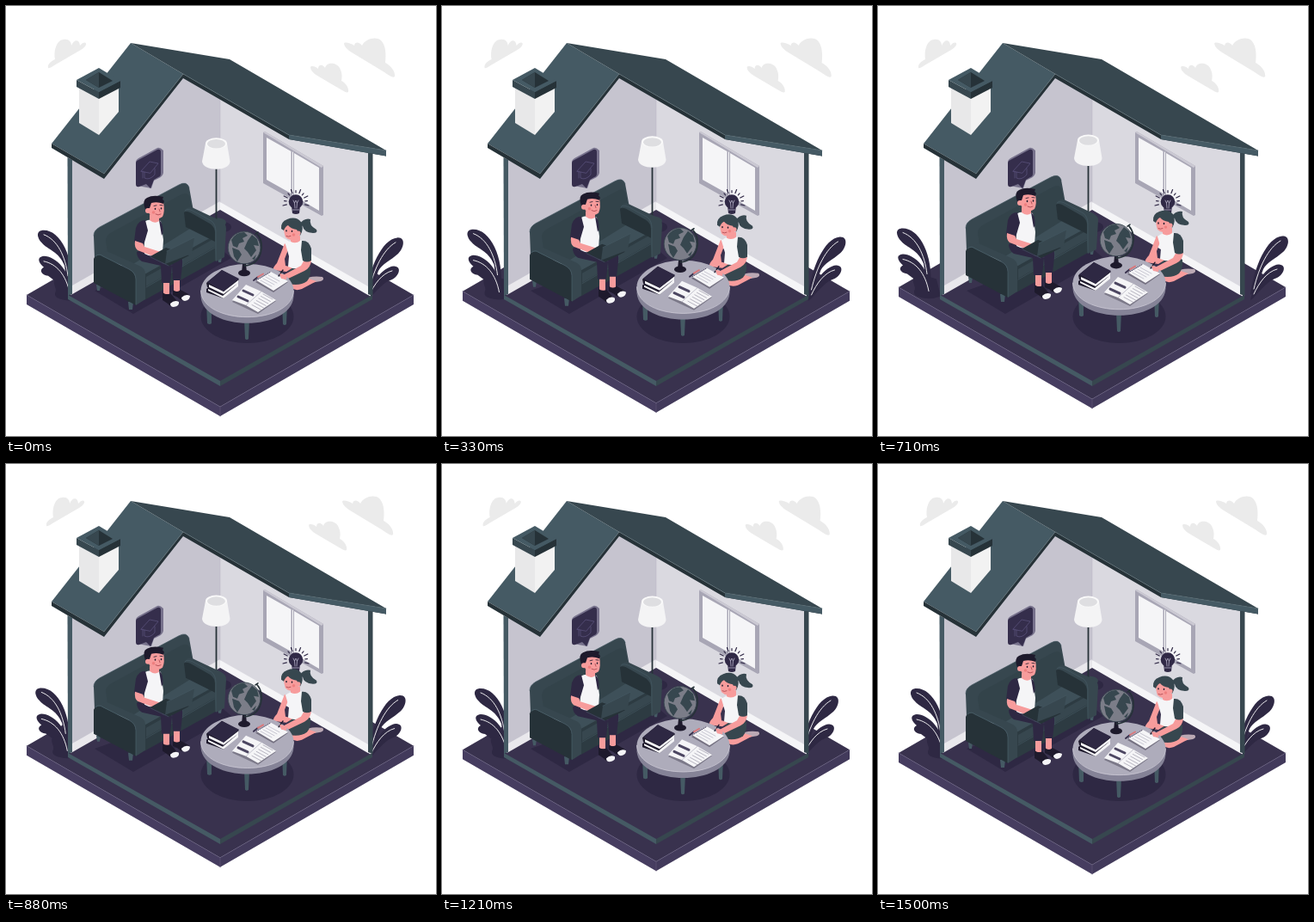
Recreate the animation shown at these times as an HTML page. Size 500x500 px, loop 1540 ms.

```html
<!DOCTYPE html>
<html lang="en">
<head>
<meta charset="utf-8">
<title>Studying at home</title>
<style>
html,body{margin:0;width:100%;height:100%;overflow:hidden;background:#fff}
svg{display:block;width:100vw;height:100vh}
.t{fill:#455a64}.m{fill:#37474f}.d{fill:#263238}
.n{fill:#39324e}.k{fill:#2e2843}.h{fill:#1e1a2c}
.w{fill:#f5f5f7}.s{fill:#f79c9c}.s2{fill:#bba9b4}
.l{fill:none;stroke-linecap:round;stroke-linejoin:round}
</style>
</head>
<body>
<svg viewBox="0 0 500 500">
<g id="clouds" fill="#ebebeb">
  <path d="M49 72C48 67 53 64 57 62C55 50 60 39 67 39C73 38 76 42 76 46C79 39 85 38 86 46C90 41 94 42 93 45Q92 48 87 51L56 69Q50 73 49 72Z"/>
  <path d="M393 44C393 41 400 43 405 46C406 41 411 42 414 46C418 38 430 35 436 40C442 46 442 57 441 66C447 69 453 76 452 82C450 84 446 81 440 77L402 54Q394 49 393 44Z"/>
  <path d="M354 71C355 69 360 70 363 73C363 67 369 68 371 72C373 64 385 66 388 72C391 78 391 82 390 87C396 90 399 96 398 100C396 102 388 96 384 94L362 81Q354 76 354 71Z"/>
</g>

<g id="plate">
  <path class="n" d="M24 336L249 206L474 336L249 466Z"/>
  <path fill="#463d60" d="M24 336L249 466V477L24 347Z"/>
  <path fill="#423a5b" d="M474 336L249 466V477L474 347Z"/>
  <path class="l" stroke="#625a7b" stroke-width=".6" d="M24 336L249 466L474 336M249 466V477"/>
</g>

<g id="plantL">
  <g class="k">
    <path d="M77 332C81 292 64 261 45 261C35 261 37 270 43 276C50 284 62 285 69 302L72 326Z"/>
    <path d="M78 340C78 308 58 291 45 291C36 292 39 299 45 304C39 307 42 313 50 314L58 320L72 338Z"/>
    <path d="M58 334C61 329 56 326 57 320Q66 313 84 320L89 340Q76 345 64 341Q57 339 58 334Z"/>
  </g>
  <path class="l" stroke="#fff" stroke-width=".9" d="M45 266C61 272 70 291 73 314M45 297C60 300 71 313 75 334"/>
</g>
<g id="plantR">
  <g class="k">
    <path d="M417 338C421 306 436 271 454 269.500C465 269 461 283 455 288C446 296 436 300 432 308L424 330Z"/>
    <path d="M417 344C421 325 437 303 450 302.500C460 303 456 314 448 318C438 321 431 330 420 342Z"/>
  </g>
  <path class="l" stroke="#fff" stroke-width=".9" d="M452 275C438 283 427 305 421 331M448 308C436 311 427 324 421 337"/>
</g>

<g>
  <path fill="#c6c4cf" d="M75 178L114 197L206 80L249 104V238L75 337Z"/>
  <path fill="#dad9e0" d="M249 104L329 152L424 168V338L249 238Z"/>
  <path fill="#e9e8ec" d="M77 325L249 227V239L77 337Z"/>
  <path class="w" d="M249 228L421 326V338L249 239Z"/>
  <path class="n" d="M72 338L249 237L426 339L249 438Z"/>
  <path class="l" stroke="#b9b7c4" stroke-width=".5" d="M249 104V228"/>
  <path class="t" d="M71.500 176L77 179V335L72 337Z"/>
  <path class="m" d="M421 168H426.500V337L421 335Z"/>
  <path class="t" d="M72 336L249 436V442L72 341Z"/>
  <path class="m" d="M426 336L249 436V442L426 341Z"/>
  <path class="t" d="M53 160L145 43L206 79L114 195Z"/>
  <path class="m" d="M145 43L260 62L442 168L329 150L206 79Z"/>
  <path class="d" d="M53 160L114 195L206 79L329 150L442 168V174.500L329 155L206 84L114 201L53 165Z"/>
  <path class="t" d="M329 150L442 168V174.500L329 155Z"/>
  <path class="l" stroke="#62777f" stroke-width=".5" d="M114 195L206 79L329 150L442 168"/>
  <path fill="#e8e8e9" d="M85 92L108 104V150L85 136Z"/>
  <path fill="#f2f2f2" d="M131 92L108 104V150L131 123Z"/>
  <path class="m" d="M82 86L108 100V108L82 94Z"/>
  <path class="d" d="M133 87L108 100V108L133 95Z"/>
  <path class="t" d="M82 86L108 72L133 87L108 100Z"/>
  <path class="d" d="M93 86L108 77L124 87L108 95Z"/>
  <path class="m" d="M93 86L108 77V95Z"/>
</g>

<g>
  <path fill="#a8a6b5" d="M299 147L301 146L369 186V243L367 244L299 206Z"/>
  <path fill="#cbc9d3" d="M299 147L301 146L369 186L367 188Z"/>
  <path class="w" d="M303 153L331.500 169V218L303 202ZM335 171L364 188V238L335 221Z"/>
  <path class="l" stroke="#fff" d="M333.500 170V219"/>
</g>

<g class="k">
  <ellipse cx="250" cy="257" rx="12" ry="6.500"/>
  <path d="M103 331L148 358L262 293L247 280Z"/>
  <ellipse cx="280.500" cy="361" rx="54" ry="31"/>
</g>

<g id="lamp">
  <ellipse class="m" cx="245" cy="252" rx="11" ry="5.500"/>
  <path class="l" stroke="#263238" stroke-width="1.800" d="M244.500 185V252"/>
  <path fill="#f4f4f5" d="M232 160L228 181C229 193 260 193 260.500 181L257 160Z"/>
  <ellipse cx="244.500" cy="160" rx="12.500" ry="6.500" fill="#fafafa"/>
  <ellipse cx="244.500" cy="160.500" rx="10.500" ry="5.200" fill="#dedee1"/>
</g>

<g class="float">
  <path class="t" d="M105 324h5l-1 7h-3ZM142 344h6l-1 9h-4ZM246 292h5l-1 6h-3Z"/>
  <path class="m" d="M102 267Q102 261 109 257L201 208Q210 203 213 211L221 255L160 306L103 294Z"/>
  <path class="d" d="M118 287L116 272Q117 266 123 263L204 219Q211 216 213 221L220 256L156 302Z" opacity=".2"/>
  <path class="l" stroke="#455a64" stroke-width=".7" d="M102 267Q102 261 109 257L201 208Q210 203 213 211"/>
  <path fill="#3e5059" d="M148 300L217 257L246 271L162 322Z"/>
  <path fill="#2d3b42" d="M161 312L244 266V296L161 342Z"/>
  <path class="m" d="M163 315L243 270V280L163 326Z"/>
  <path class="l" stroke="#455a64" stroke-width=".6" d="M163 327L243 281M205 291V303"/>
  <path class="m" d="M207 241Q208 233 216 234L250 250Q256 253 256 259L254 292L244 297L242 268Z"/>
  <path class="d" d="M207 240Q209 238 214 240L237 253Q243 257 243 264V274L209 257Z"/>
  <path class="l" stroke="#455a64" stroke-width=".7" d="M208 238Q210 235 217 238L239 250Q244 254 244 263V296"/>
  <path class="d" d="M102 294Q104 289 110 290L143 306Q151 310 151 318V348L102 322Z"/>
  <path class="m" d="M103 292Q107 286 117 285L157 303Q162 306 162 312V341L151 348V318Q150 310 143 306L110 290Q106 289 103 292Z"/>
  <path class="l" stroke="#4c626c" stroke-width=".7" d="M104 291Q108 287 113 291L143 306Q151 310 151 318V347"/>
</g>

<g>
  <path fill="#77728c" d="M151 181Q151 179 154 177L176 165Q179 164 183 168V194Q182 198 178 200L172 203L169 212L153 209Z"/>
  <path fill="#352e4c" d="M151 183Q151 180 154 179L176 167Q180 166 180 170V195Q180 198 177 199L172 202L168 212L163 207L155 210Q151 211 151 207Z"/>
  <path class="l" stroke="#5d5580" stroke-width=".7" d="M157 192L167 181L177 183L168 194ZM161 193V200Q167 203 173 196V189M159 192V200"/>
</g>

<g>
  <circle cx="337" cy="227.500" r="8.300" fill="#302946"/>
  <path fill="#302946" d="M332 232H342L341 241Q337 243 333 241Z"/>
  <path class="l" stroke="#c9c5da" stroke-width=".7" d="M334 226L335.500 229L337 226L338.500 229L340 226M335.500 229L336 235M338.500 229L338 235M333.500 237H340.500"/>
  <g id="rays" class="l" stroke="#302946" stroke-width="1.200"></g>
</g>

<g class="float">
  <path class="s" d="M183 318h7v17h-7ZM195 314h7v18h-7Z"/>
  <path class="h" d="M182 333Q187 337 191 334L198 342Q202 347 197 349Q191 350 188 346L182 342ZM194 330Q199 334 203 330L212 335Q216 340 209 342Q203 343 200 339L194 336Z"/>
  <path class="w" d="M191 346Q196 341 201 344Q202 349 195 350Q191 350 191 346ZM204 339Q209 334 214 337Q214 342 208 343Q204 342 204 339Z"/>
  <path class="k" d="M152 286Q164 280 182 284L202 290Q206 293 205 301L203 319H194L193 302L191 322H181L180 302L158 297Q152 293 152 286Z"/>
  <path class="l" stroke="#4b4464" stroke-width=".6" d="M182 299L193 301"/>
  <path class="w" d="M160 251Q168 246 180 250L183 272L182 287Q171 294 161 288Z"/>
  <path class="s" d="M167 243H178V250Q173 254 167 249Z"/>
  <path class="k" d="M162 249Q154 249 151 258L149 274L160 278L165 261ZM178 249Q183 252 182.500 264L181 267Z"/>
  <path class="s" d="M150 273L159 276L161 280L180 286Q186 290 183 294L171 291L153 284Q149 281 150 273Z"/>
  <path class="d" d="M168 291L186 281L213 290L190 302Z"/>
  <path class="m" d="M187 285L219 269L216 288L185 300Z"/>
  <path class="l" stroke="#455a64" stroke-width=".6" d="M187 285L219 269M168 292L189 302"/>
  <path class="s" d="M164 231Q170 224 183 228Q185 239 182 245Q177 249 170 246Q165 242 164 231Z"/>
  <path class="h" d="M162 237Q158 225 164 223Q171 219 183 222L182 225Q185 226 183 230Q176 227 169 229L167 235Z"/>
  <circle class="s" cx="165" cy="238" r="3"/>
  <path class="l" stroke="#1e1a2c" stroke-width="1.500" d="M173.500 235.500v.8M180.500 235v.8"/>
  <path class="l" stroke="#1e1a2c" stroke-width=".8" d="M172 232.500l3-.7M179 231.500l3 .3"/>
  <path class="l" stroke="#a8434c" stroke-width=".8" d="M174 242Q177 244 180 242M178 236l1 3"/>
  <circle cx="171.500" cy="240" r="1.800" fill="#ee7f7f"/>
</g>

<g class="float">
  <path class="s2" d="M342 319Q354 313 368 315Q371 318 366 320L354 322Z"/>
  <path class="s" d="M333 321L352 317L361 320L344 329Q336 332 331 327Z"/>
  <path class="m" d="M330 300Q346 297 354 304Q355 314 350 320Q342 326 328 323Z"/>
  <path class="s" d="M324 276L329 281L324 294L325 302L334 304L326 309L311 307Q310 304 315 299Z"/>
  <path class="w" d="M325 277Q333 270 345 273L351 285L350 303Q339 308 328 303L329 291Z"/>
  <path class="s" d="M347 295L355 294Q355 304 347 308L326 318L321 316L324 312L343 302Z"/>
  <path class="m" d="M344 273Q352 272 355 282V296Q350 299 345 296L343 284Z"/>
  <path class="s" d="M331 267H342V273Q337 277 331 274Z"/>
  <path class="m" d="M341 254Q347 246 354 248Q352 255 361 260Q363 264 357 264Q346 263 345 256Z"/>
  <path class="s" d="M323 256Q329 250 341 257Q343 267 337 271Q330 274 325 269Q323 264 323 256Z"/>
  <path class="m" d="M320 259Q319 251 327 248Q337 244 343 251Q347 259 342 267L338 260Q331 259 328 255Q325 256 323 261Z"/>
  <circle class="s" cx="340" cy="264" r="2.500"/>
  <path class="l" stroke="#1e1a2c" stroke-width="1.500" d="M326 261v.8M332.500 261.500v.8"/>
  <path class="l" stroke="#a8434c" stroke-width=".8" d="M326 267.500Q328 269 331 267.500"/>
  <circle cx="334.500" cy="266" r="1.700" fill="#ee7f7f"/>
</g>

<g class="float">
  <path class="t" d="M233 345h6v24q-2 2-5 0ZM277 364h6l-1 23q-2 2-4 0ZM321 345h6l-1 25q-2 2-4 0Z"/>
  <path fill="#858397" d="M226.500 331V338C230 379 331 379 334.500 338V331Z"/>
  <ellipse cx="280.500" cy="331" rx="54" ry="31" fill="#aeacbb"/>
  <path class="l" stroke="#d1cfda" stroke-width=".7" d="M226.500 331C228 372 333 372 334.500 331"/>

  <ellipse class="h" cx="277" cy="310.500" rx="7" ry="3.800"/>
  <path class="h" d="M275 300h4l1 10h-6Z"/>
  <path class="l" stroke="#263238" stroke-width="1.600" d="M290 265L293 263M292 265C302 276 298 301 277 302"/>
  <circle cx="277" cy="281" r="18.800" fill="#7b7d88" stroke="#37474f" stroke-width=".8"/>
  <path class="m" d="M262 272Q267 263 277 263L281 267L275 270L277 274L271 276L269 281L264 279ZM263 281L271 284L274 289L269 297L265 291ZM281 273L286 266L292 271L294 279L288 278L291 284L285 292L281 286L277 282ZM286 294L291 289L289 295Z"/>

  <path class="h" d="M233 329L250 315L270 325L253 340Q239 335 233 333Z"/>
  <path class="w" d="M235 329L252 337L270 322V326L253 340L235 331Z"/>
  <path class="h" d="M233 322L251 307L271 318L253 334V336L234 327Z"/>
  <path class="w" d="M236 324L253 332L270 319V322L253 335L236 327Z"/>
  <path class="k" d="M234 321L251 307L271 317L253 332Z"/>

  <path class="h" d="M263 344L280 325L314 343L293 358Z" opacity=".35"/>
  <path class="w" d="M263 342L279 324L297 332L314 342L293 356L279 348Z"/>
  <path class="l" stroke="#a5a3b4" stroke-width=".6" d="M279 348L297 332"/>
  <path class="l" stroke="#4d4762" stroke-width="3" stroke-linecap="butt" d="M276 331L287 336M270 338L281 343"/>
  <g id="lines" class="l" stroke="#8d8a9d" stroke-width=".6"></g>

  <path class="h" d="M290 321L308 310L328 321L311 333Z" opacity=".4"/>
  <path class="w" d="M291 319L308 309L328 320L311 331Z"/>
  <path class="l" stroke="#4d4762" stroke-width="1" stroke-dasharray="1 1.500" d="M291 319L308 309"/>
  <path class="l" stroke="#aaa8b9" stroke-width=".6" d="M296 319L309 326M299 317L312 324M302 315L315 322M305 313L318 320"/>
  <path class="l" stroke="#37304c" stroke-width="2" d="M288 319L293 315"/>
  <path class="l" stroke="#d9787c" stroke-width="2" d="M293 315L299 311.500"/>
  <path class="l" stroke="#1e1a2c" stroke-width="1.300" d="M317 314L322 307"/>
  <path class="s" d="M318 311L327 313L326 318L320 317Z"/>
</g>
</svg>
<script>
const LOOP = 1540;
const $ = id => document.getElementById(id);
const floats = [...document.querySelectorAll('.float'), $('plate')];
const lift = [[0, 0], [40, 0], [210, -2.7], [500, -6.5], [770, -9.6], [1080, -5.6], [1330, -2], [1500, 0], [LOOP, 0]];
const drift = [[0, 0], [210, 1], [500, 0], [710, -1.9], [1080, -2], [1330, -.7], [1500, 0], [LOOP, 0]];

let rays = '';
for (let i = 0; i < 11; i++) {
  const a = (165 + i * 21) * Math.PI / 180, c = Math.cos(a), s = Math.sin(a), r = i % 2 ? 13.5 : 15.5;
  rays += `M${337 + 11 * c} ${228 + 11 * s}L${337 + r * c} ${228 + r * s}`;
}
$('rays').innerHTML = `<path d="${rays}"/>`;

let rows = '';
for (let i = 0; i < 6; i++) rows += `M${299 - i * 2.6} ${335 + i * 2.5}l11 6`;
$('lines').innerHTML = `<path d="${rows}"/>`;

function track(keys, t) {
  const i = keys.findIndex(k => k[0] > t), [a, u] = keys[i - 1], [b, v] = keys[i];
  return u + (v - u) * (t - a) / (b - a);
}

// Two swings, then a rest
function swing(t) {
  const u = (t + 40) % LOOP;
  return u < 1000 ? Math.sin(Math.PI * u / 500) ** 2 : 0;
}

function move(el, x, y) {
  el.setAttribute('transform', `translate(${x.toFixed(2)} ${y.toFixed(2)})`);
}

function draw(now) {
  const t = now % LOOP, y = track(lift, t), s = swing(t);
  floats.forEach(el => move(el, 0, y));
  move($('clouds'), track(drift, t), 0);
  move($('lamp'), 0, -4 * s);
  move($('plantL'), -16 * s, -2.5 * s);
  move($('plantR'), 16 * s, -2 * s);
}

let start;
function tick(now) {
  start ??= now;
  draw(now - start);
  requestAnimationFrame(tick);
}
draw(0);
requestAnimationFrame(tick);
</script>
</body>
</html>
```
